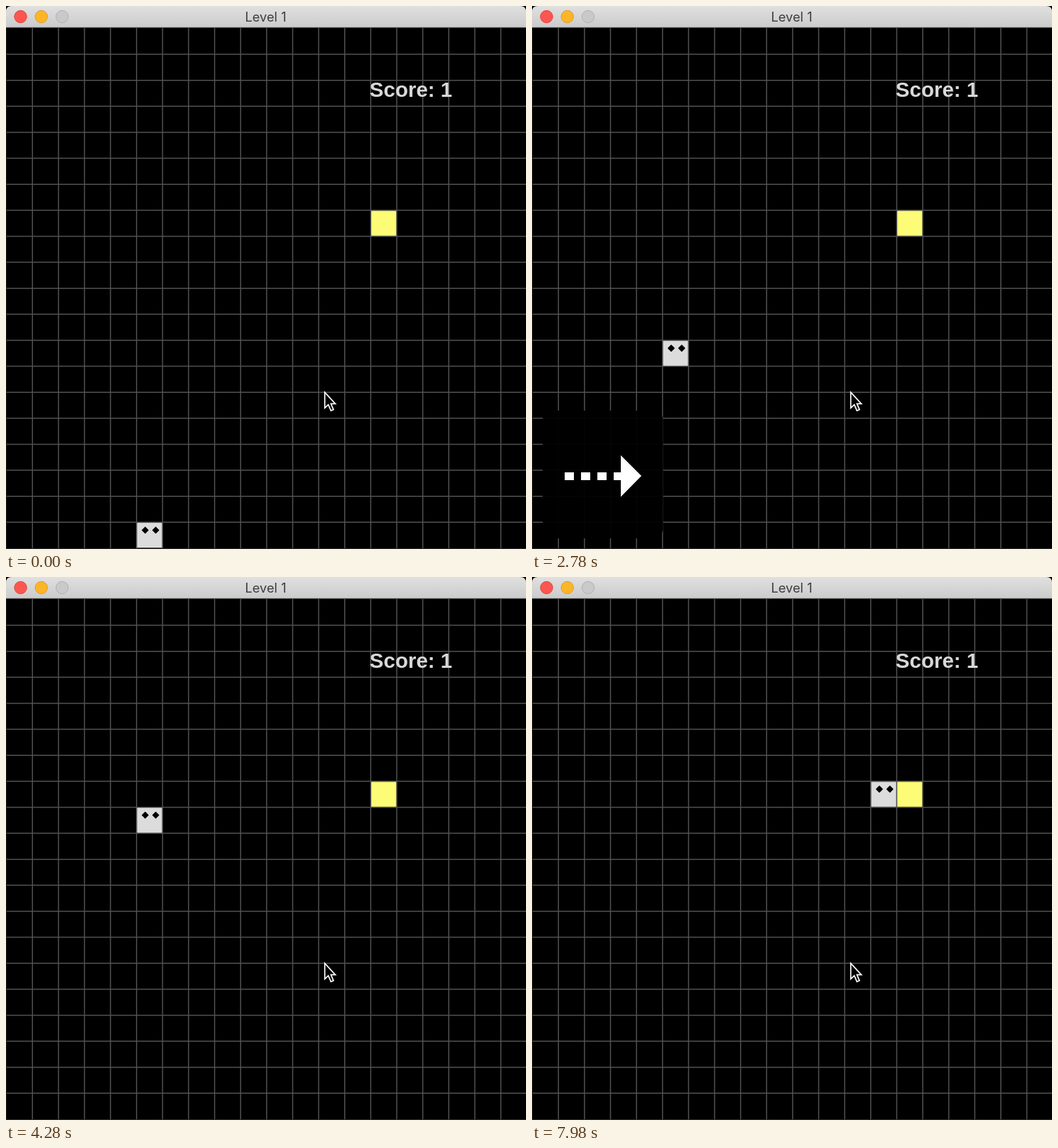
An HTML page for the animation above (8 s loop, 732 by 765 pixels).

```html
<!DOCTYPE html>
<html lang="en">
<head>
<meta charset="utf-8">
<title>Level 1</title>
<style>
  html, body { margin: 0; width: 100%; height: 100%; overflow: hidden; background: #000; }
  svg { display: block; width: 732px; height: 765px; }
</style>
</head>
<body>
<svg viewBox="0 0 732 765" xmlns="http://www.w3.org/2000/svg">
  <defs>
    <linearGradient id="bar" x2="0" y2="1">
      <stop offset="0" stop-color="#e0e0e0"/>
      <stop offset="1" stop-color="#cbcbcb"/>
    </linearGradient>
  </defs>
  <rect width="732" height="765"/>
  <path id="grid" stroke="#515153" stroke-width="1.5" fill="none"/>
  <path d="M0.5 31V765" stroke="#1c1c10"/>
  <path d="M0 764.5H732" stroke="#2a2a2a"/>

  <path d="M0 30V8Q0 0 8 0H724Q732 0 732 8V30Z" fill="url(#bar)"/>
  <path d="M0 30.2H732" stroke="#8c8c8c" stroke-width=".8"/>
  <g stroke-width="1">
    <circle cx="20.5" cy="15" r="8.7" fill="#fc5650" stroke="#df4640"/>
    <circle cx="49.7" cy="15" r="8.7" fill="#fdb528" stroke="#de9d2a"/>
    <circle cx="79" cy="15" r="8.7" fill="#c9c9c9" stroke="#b2b2b2"/>
  </g>
  <text x="365.5" y="22" text-anchor="middle" font-family="Inter, Roboto, sans-serif" font-size="18.3" fill="#3e3e3e">Level 1</text>

  <text x="511.8" y="128" font-family="'Liberation Sans', Arial, sans-serif" font-weight="700" font-size="29.5" fill="#d8d8d8">Score: 1</text>
  <rect id="food" width="35.2" height="35.2" fill="#fcfc76"/>
  <g id="player">
    <rect width="35.2" height="35.2" fill="#dcdcdc"/>
    <path d="M11.5 6.4l4 4-4 4-4-4ZM26.3 6.4l4 4-4 4-4-4Z" stroke="#000" stroke-width="1.6" stroke-linejoin="round"/>
  </g>

  <g id="hint">
    <rect x="15" y="570" width="169.5" height="180" rx="14" fill="#000" fill-opacity=".95"/>
    <path d="M46 657h13v11h-13ZM69 657h13v11h-13ZM92 657h13v11h-13ZM115 657h10V633L154 662 125 691.5V668h-10Z" fill="#fff"/>
  </g>
  <path d="M448.7 544.2V566.4L453.7 561.7 457.4 570.2 461 568.6 457.4 560.4H463.6Z" stroke="#fff" stroke-width="1.7"/>
</svg>
<script>
  const LOOP = 8000, STEP = 393, LEAD = 240;
  const CELL = 36.63, LEFT = 0.6, TOP = 31.4;
  const START = { col: 5, row: 19 }, RISE = 12;
  const HINT_ON = 2630, HINT_FADE = 4130, FADE = 110;

  const $ = id => document.getElementById(id);
  const colX = c => LEFT + c * CELL;
  const rowY = r => TOP + r * CELL;
  const place = (el, col, row) =>
    el.setAttribute('transform', `translate(${colX(col) + 0.7} ${rowY(row) + 0.7})`);

  let lines = '';
  for (let i = 1; i < 20; i++) lines += `M${colX(i)} 31V765M0 ${rowY(i)}H732`;
  $('grid').setAttribute('d', lines);
  place($('food'), 14, 7);

  // Twelve cells up, then right
  function draw(t) {
    const n = Math.floor((t + LEAD) / STEP);
    const up = Math.min(n, RISE);
    place($('player'), START.col + n - up, START.row - up);

    const fade = Math.max(0, Math.min(1, 1 - (t - HINT_FADE) / FADE));
    $('hint').setAttribute('opacity', t < HINT_ON ? 0 : fade);
  }

  const began = performance.now();
  function tick() {
    draw((performance.now() - began) % LOOP);
    requestAnimationFrame(tick);
  }
  draw(0);
  requestAnimationFrame(tick);
</script>
</body>
</html>
```
